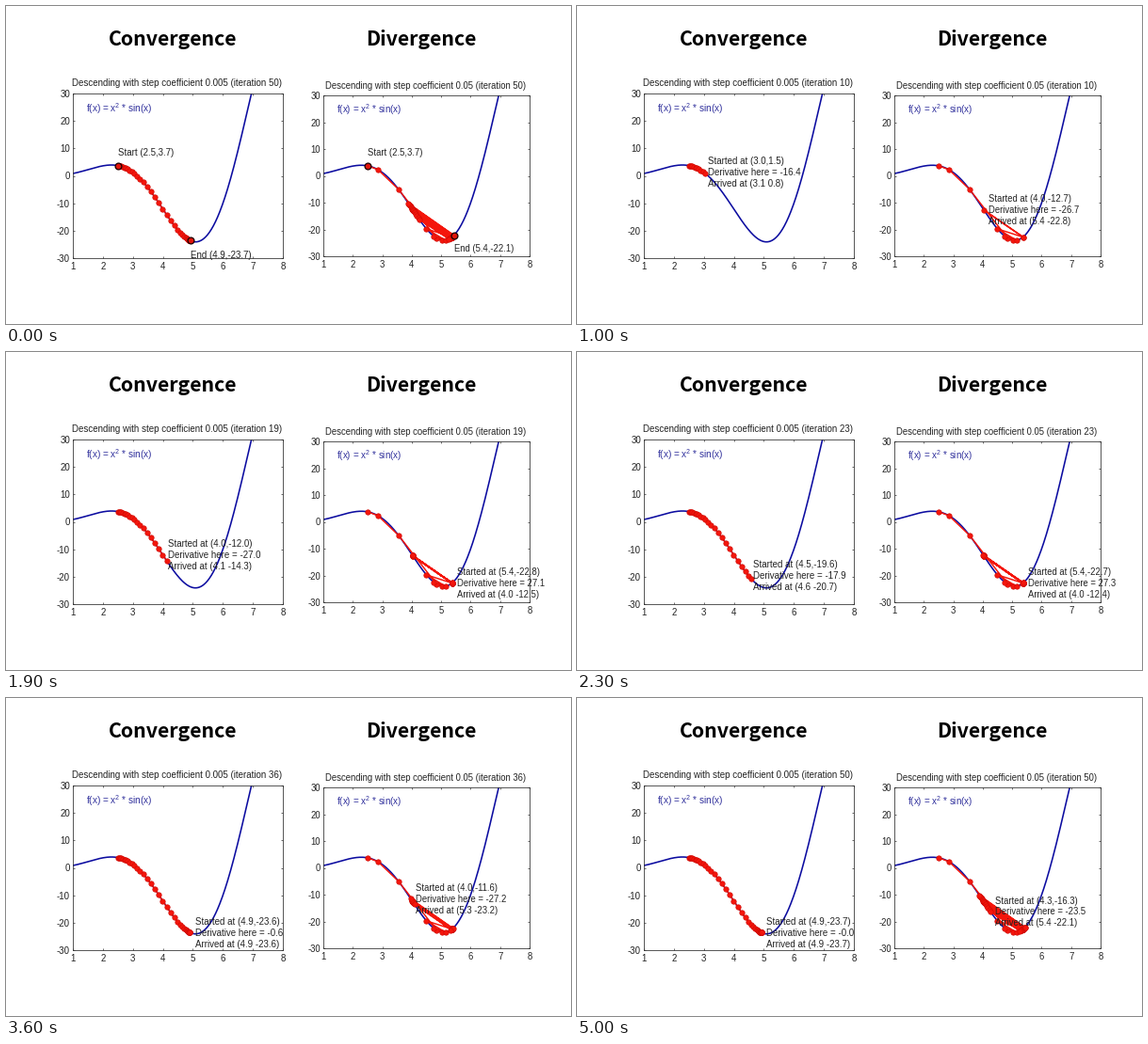
Recreate the animation shown at these times as a matplotlib script. Size 600x338 px, loop 5.11 s.

```python
import numpy as np
import matplotlib.pyplot as plt
from matplotlib.animation import FuncAnimation

W, H, DPI = 600, 338, 72  # at 72 dpi one point is one pixel
STEPS = 50
STEP_MS = 100
FRAMES, TICK_MS = 146, 35  # the last step stays a little longer
BLUE, RED, DARK_RED, INK = "#0c0ca0", "#f4160c", "#d20a04", "#222222"

plt.rcParams.update({
    "font.family": "Liberation Sans",
    "axes.unicode_minus": False,
    "axes.linewidth": 0.8,
    "axes.edgecolor": "#303030",
    "text.color": INK,
})


def f(x):
    return x ** 2 * np.sin(x)


def slope(x):
    return 2 * x * np.sin(x) + 2 * x ** 2 * np.cos(x)


def descend(rate, x=2.5):
    path = [x]
    for _ in range(STEPS):
        x -= rate * slope(x)
        path.append(x)
    return np.array(path)


class Panel:
    """One plot with its descent path, step notes and end markers."""

    def __init__(self, fig, box, rate, size):
        left, top, right, bottom = box
        self.rate = rate
        self.xs = descend(rate)
        self.ys = f(self.xs)
        self.size = size
        self.ax = fig.add_axes([left / W, 1 - bottom / H,
                                (right - left) / W, (bottom - top) / H])
        self.style_axes()

        grid = np.linspace(1, 8, 400)
        self.ax.plot(grid, f(grid), color=BLUE, lw=1.6, zorder=2.5)
        formula = self.label(1.45, 23.3,
                             r"f(x) = x$^{\mathregular{2}}$ * sin(x)",
                             color="#30309c")
        formula.set_fontsize(size * 1.03)
        self.title = self.label(4.47, 32.6, ha="center")
        self.path, = self.ax.plot([], [], "-o", color=RED, lw=1.5, ms=5.4,
                                  mec=DARK_RED, mew=0.7, zorder=3,
                                  clip_on=False)
        self.ends, = self.ax.plot(self.xs[[0, -1]], self.ys[[0, -1]], "o",
                                  color="#e0140c", ms=6.8, mec="#200000",
                                  mew=1.3, zorder=4)
        self.notes = [self.label() for _ in range(3)]

    def style_axes(self):
        ax = self.ax
        ax.set(xlim=(1, 8), ylim=(-30, 30),
               xticks=range(1, 9), yticks=range(-30, 31, 10))
        ax.tick_params(direction="in", top=True, right=True, length=2.4,
                       width=0.7, color="#303030", labelcolor=INK,
                       labelsize=self.size)
        ax.tick_params(axis="x", pad=3.6)
        ax.tick_params(axis="y", pad=3)

    def label(self, x=0, y=0, text="", **style):
        return self.ax.text(x, y, text, fontsize=self.size, zorder=6,
                            va="baseline", **style)

    def note(self, i, x, y, text):
        self.notes[i].set_position((x, y - 1.2))
        self.notes[i].set_text(text)

    def show(self, step):
        done = step == 0
        count = STEPS if done else step
        xs, ys = self.xs, self.ys
        self.title.set_text(f"Descending with step coefficient {self.rate} "
                            f"(iteration {count})")
        self.path.set_data(xs[:count + 1], ys[:count + 1])
        self.ends.set_visible(done)
        if done:
            self.note(0, xs[0], ys[0] + 5, f"Start ({xs[0]:.1f},{ys[0]:.1f})")
            self.note(1, xs[-1], ys[-1] - 5,
                      f"End ({xs[-1]:.1f},{ys[-1]:.1f})")
            self.note(2, 0, 0, "")
            return
        x, y = xs[step - 1], ys[step - 1]
        lines = (f"Started at ({x:.1f},{y:.1f})",
                 f"Derivative here = {slope(x):.1f}",
                 f"Arrived at ({xs[step]:.1f} {ys[step]:.1f})")
        for i, line in enumerate(lines):
            self.note(i, x + 0.17, y + 4.13 * (1 - i), line)


fig = plt.figure(figsize=(W / DPI, H / DPI), dpi=DPI, facecolor="white")
for x, text in ((177.5, "Convergence"), (441, "Divergence")):
    fig.text(x / W, 1 - 42 / H, text, family="Noto Sans CJK JP",
             fontsize=21.3, weight="bold", color="black",
             ha="center", va="baseline")

panels = [Panel(fig, (71, 93, 294, 268), 0.005, 9.7),
          Panel(fig, (337, 95, 556, 266), 0.05, 9.53)]


def update(frame):
    # the step reached by the end of this tick
    step = min(((frame + 1) * TICK_MS - 1) // STEP_MS, STEPS)
    for panel in panels:
        panel.show(step)


anim = FuncAnimation(fig, update, frames=FRAMES, init_func=lambda: update(0),
                     interval=TICK_MS, repeat=True, repeat_delay=0, blit=False)
plt.show()
```
